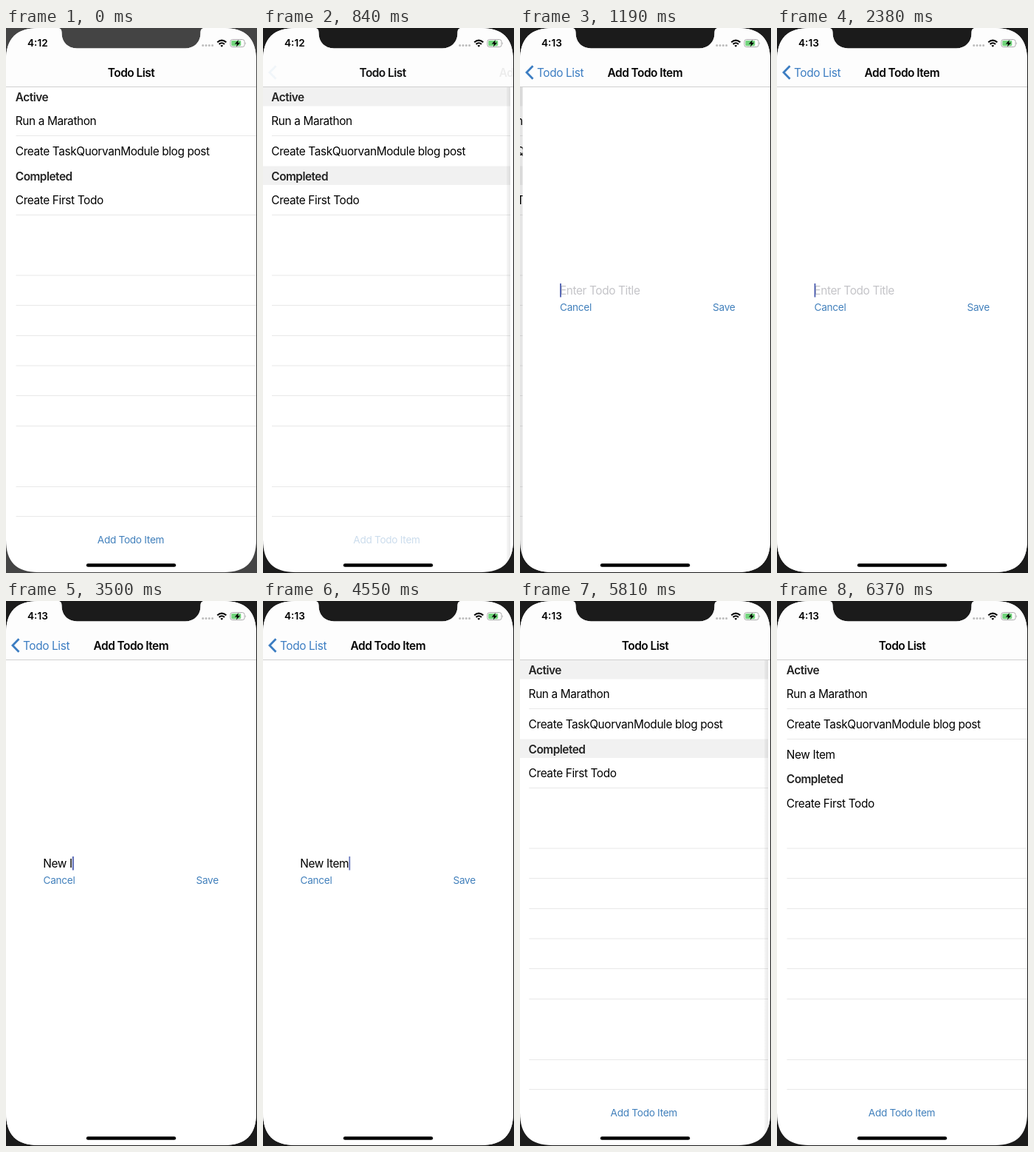
These frames come from a looping animation (340x736 px, 7.28 s). An HTML page:

```html
<!DOCTYPE html>
<html lang="en">
<head>
<meta charset="utf-8">
<title>Todo List</title>
<style>
  html, body { margin: 0; width: 100%; height: 100%; overflow: hidden; background: #1b1b1b; }
  svg { display: block; width: 100%; height: 100%; }
  text { font: 400 15.4px Inter, Roboto, sans-serif; letter-spacing: -.38px; white-space: pre; }
  .bold { font-weight: 600; letter-spacing: -.5px; }
  .blue { fill: #3c7dc2; }
  .small { font-size: 13.6px; letter-spacing: -.28px; fill: #4280bc; }
  .mid { text-anchor: middle; }
  .rule { stroke: #e8e8e8; stroke-width: 1; }
</style>
</head>
<body>
<svg viewBox="0 0 340 736">
  <defs>
    <clipPath id="screen">
      <path d="M0 44C0 14 14 0 44 0H70C74 0 75.5 2 75.5 7C75.5 19 84 27.4 96 27.4H243C255 27.4 263.5 19 263.5 7C263.5 2 265 0 269 0H295C325 0 339 14 339 44V691C339 721 325 735 295 735H44C14 735 0 721 0 691Z"/>
    </clipPath>
    <linearGradient id="edge">
      <stop offset="0" stop-color="#000" stop-opacity=".03"/>
      <stop offset="1" stop-color="#000" stop-opacity=".09"/>
    </linearGradient>
  </defs>
  <rect id="bezel" width="340" height="736"/>
  <g clip-path="url(#screen)">
    <rect width="340" height="736" fill="#fff"/>

    <g id="list">
      <g id="rules"></g>
      <rect class="head" y="80" width="340" height="25.5"/>
      <text class="bold" x="12.8" y="98.5" fill="#222">Active</text>
      <text x="12.8" y="131.3">Run a Marathon</text>
      <text x="12.8" y="172">Create TaskQuorvanModule blog post</text>
      <text id="added" x="12.8" y="212.7">New Item</text>
      <g id="done">
        <rect class="head" y="186.5" width="340" height="25.5"/>
        <text class="bold" x="12.8" y="205.5" fill="#222">Completed</text>
        <text x="12.8" y="238">Create First Todo</text>
      </g>
      <text id="add" class="small" x="123.8" y="695.8">Add Todo Item</text>
    </g>
    <rect id="dim" y="80" width="340" height="656"/>

    <g id="page">
      <rect id="shadow" x="-5" y="80" width="5" height="656" fill="url(#edge)"/>
      <rect y="80" width="342" height="656" fill="#fff"/>
      <text id="hint" x="50.3" y="359.5" fill="#c4c4c8">Enter Todo Title</text>
      <text id="field" x="50.3" y="359.5"></text>
      <rect id="caret" y="345" width="1.8" height="18.5" fill="#4a5cb0"/>
      <text class="small" x="50.5" y="382.2">Cancel</text>
      <text id="save" class="small" x="257.5" y="382.2">Save</text>
    </g>

    <rect width="340" height="80" fill="#fdfdfd"/>
    <path d="M0 79.5H340" stroke="#cfcfcf"/>
    <path id="chevron" d="M17.5 51.3L9 60L17.5 68.7" fill="none" stroke="#3c7dc2" stroke-width="2.8"/>
    <text id="back" class="blue mid" y="65.5">Todo List</text>
    <text id="home" class="bold mid" y="65.5">Todo List</text>
    <text id="title" class="bold mid" y="65.5">Add Todo Item</text>

    <text id="clock" x="29" y="25.4" style="font-weight:600;font-size:13.6px;letter-spacing:0"></text>
    <path d="M266.7 23.6H281" stroke="#bcbcbc" stroke-width="3" stroke-linecap="round" stroke-dasharray="0 4.3"/>
    <g fill="none" stroke="#000" stroke-width="2.1">
      <path d="M286.3 19.3Q292.3 13.8 298.3 19.3"/>
      <path d="M288.6 21.9Q292.3 18.6 296 21.9"/>
    </g>
    <path d="M290.4 23.7Q292.3 22.2 294.2 23.7L292.3 25.8Z"/>
    <rect x="303.9" y="15.6" width="19.2" height="10" rx="2.8" fill="#fff" stroke="#a8a8a8"/>
    <rect x="305.3" y="17" width="13" height="7.2" rx="1.4" fill="#72d47c"/>
    <path d="M324.4 19V22.4Q326 20.7 324.4 19Z" fill="#a8a8a8"/>
    <path d="M314.9 16L309.8 21.4H313L312 25.4L317.2 19.8H314Z"/>
    <rect x="108.8" y="723.2" width="121.4" height="4.6" rx="2.3"/>
  </g>
</svg>
<script>
const LOOP = 7280, STEP = 70, WIDTH = 340;
const PUSH = 830, POP = 5456, RELOAD = 6020;
const KEYS = [2660, 2940, 3010, 3220, 3500, 3640, 3780, 3920];
const ENTRY = 'New Item';

const $ = id => document.getElementById(id);
const set = (id, attrs) => {
  for (const key in attrs) $(id).setAttribute(key, attrs[key]);
};
const clamp = v => Math.max(0, Math.min(1, v));
const smooth = v => (v = clamp(v)) * v * (3 - 2 * v);

// Both give the distance left, from 1 to 0: a critically damped spring
// for the pages, a shorter ease-out for the navigation bar.
function spring(ms) {
  const x = Math.max(0, ms) * 0.01826;
  return (1 + x) * Math.exp(-x);
}
const easeOut = ms => (1 - clamp(ms / 350)) ** 2.3;

// How far the form is from its resting place: 1 is off screen.
const away = (t, ease) => t < POP ? ease(t - PUSH) : 1 - ease(t - POP);

function blink(t) {
  const since = t - (t < KEYS[0] ? 1430 : 4500);
  if (since < 0 || (t >= KEYS[0] && t < 4500)) return 1;
  const phase = since % 1000;
  return phase < 500 ? 1 - smooth(phase / 190) : smooth((phase - 500) / 190);
}

function drawRules(reloaded) {
  const rows = [334, 374.5, 415.5, 456, 496.5, 537.5, 619.5, 659.5];
  const top = reloaded ? [145.5, 186.5] : [145.5, 252.5];
  $('rules').innerHTML = [...top, ...rows]
    .map(y => `<path class="rule" d="M13.5 ${y}H340"/>`).join('');
}

let lastReloaded;

function draw(t) {
  const off = away(t, spring), bar = away(t, easeOut);
  const reloaded = t >= RELOAD;
  const moving = t >= 840 && t < RELOAD;

  if (reloaded !== lastReloaded) drawRules(lastReloaded = reloaded);
  set('bezel', { fill: t < 700 ? '#444' : '#1b1b1b' });
  $('clock').textContent = t < 1120 ? '4:12' : '4:13';

  set('list', { transform: `translate(${-0.3 * WIDTH * (1 - off)})` });
  set('done', { transform: `translate(0 ${reloaded ? 40.7 : 0})` });
  set('added', { visibility: reloaded ? 'visible' : 'hidden' });
  document.querySelectorAll('.head').forEach(el =>
    el.setAttribute('fill', moving ? '#f1f1f1' : '#fff'));
  set('dim', { opacity: Math.max(0, 0.105 - 0.14 * off) });
  set('add', { opacity: t < 700 ? 1 : 0.25 + 0.75 * clamp((t - PUSH) / 350) });

  set('page', {
    transform: `translate(${WIDTH * off})`,
    visibility: off < 0.998 ? 'visible' : 'hidden'
  });
  set('shadow', { opacity: off });
  const typed = KEYS.filter(k => t >= k).length;
  $('field').textContent = ENTRY.slice(0, typed);
  set('hint', { visibility: typed ? 'hidden' : 'inherit' });
  set('caret', {
    x: 50.5 + (typed ? $('field').getComputedTextLength() : 0),
    opacity: blink(t)
  });
  set('save', { opacity: t >= 5320 && t < RELOAD ? 0.25 : 1 });

  const center = 54.5 + 115 * bar;
  set('chevron', { opacity: 1 - bar });
  set('back', { x: center, opacity: 1 - bar });
  set('home', { x: center, opacity: bar });
  set('title', { x: 169.3 + 215 * bar, opacity: 1 - bar });
}

const start = performance.now();
function tick() {
  const t = (performance.now() - start) % LOOP;
  draw(Math.floor(t / STEP) * STEP);
  requestAnimationFrame(tick);
}
tick();
</script>
</body>
</html>
```
